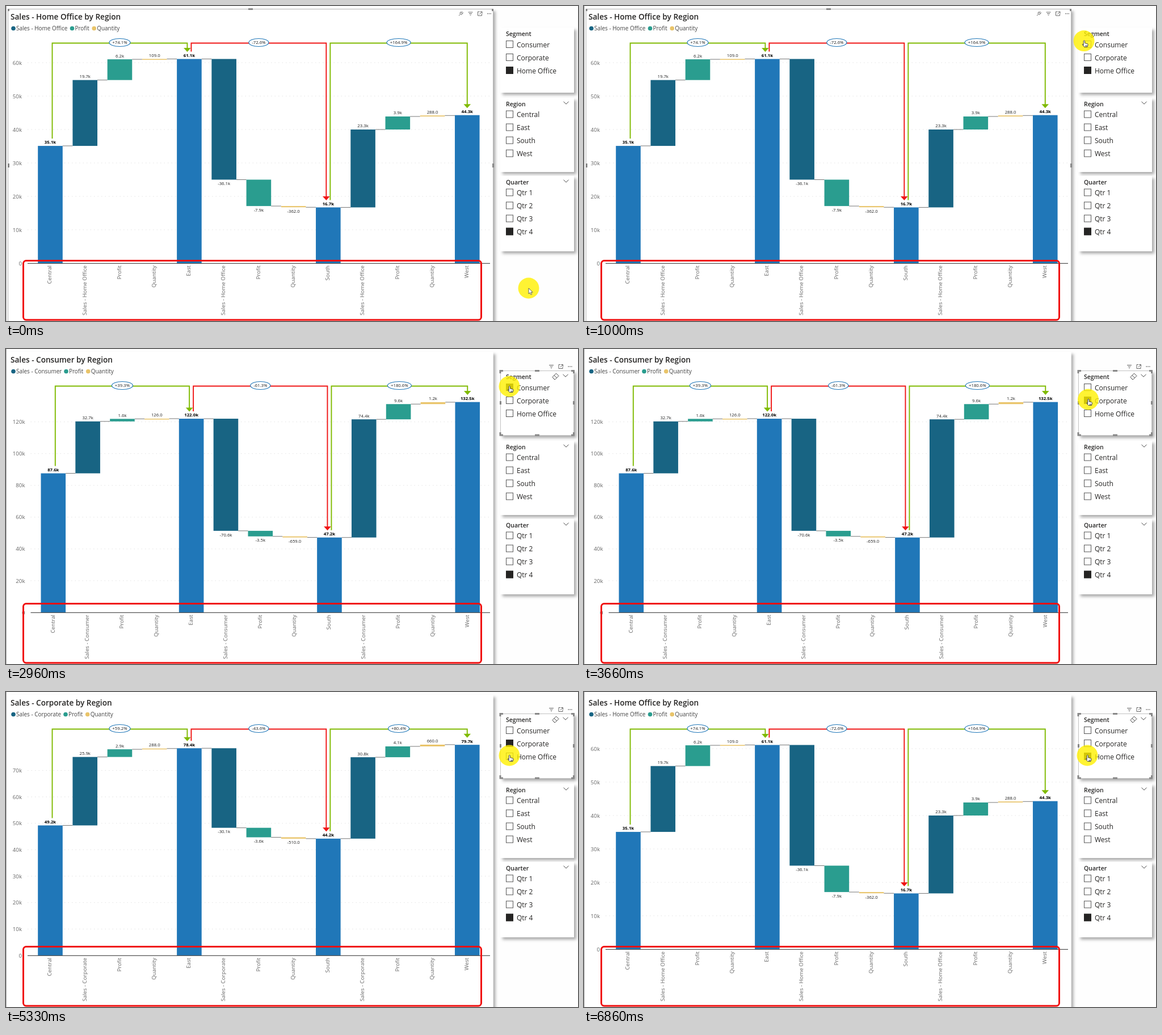
These frames come from a looping animation (1008x556 px, 7360 ms). An HTML page:

```html
<!DOCTYPE html>
<html lang="en">
<head>
<meta charset="utf-8">
<title>Sales by Region</title>
<style>
  html, body { margin: 0; width: 100%; height: 100%; overflow: hidden; background: #fefefe; }
  svg { display: block; width: 1008px; height: 556px; }
  text { font-family: "Open Sans", "Noto Sans", sans-serif; fill: #252423; }
  .title { font-size: 13.6px; font-weight: 600; }
  .legend { font-size: 9.95px; fill: #444; }
  .axis { font-size: 9.7px; fill: #666; text-anchor: end; }
  .value { font-size: 7.75px; text-anchor: middle; fill: #222; }
  .total { font-weight: 700; fill: #000; }
  .head { font-size: 10.5px; font-weight: 600; }
  .item { font-size: 12px; }
  .icon { fill: none; stroke: #666; }
</style>
</head>
<body>
<svg id="stage" viewBox="0 0 1008 556"></svg>
<script>
const LOOP = 7360;
const BLUE = '#2077b8', DARK = '#186483', TEAL = '#2a9d8f', GOLD = '#e9c46a';
const GREEN = '#7fba00', RED = '#f01414';
const REGIONS = ['Central', 'East', 'South', 'West'];

// first total, then the nine changes between the four regions, in thousands
const homeOffice = {
  name: 'Home Office', zero: 454, scale: 5.9, tick: 10, ticks: 6, left: 56.2, step: 61.23, axisX: 28, legendX: 116.5,
  start: 35.1, deltas: [19.7, 6.2, .109, -36.1, -7.9, -.362, 23.3, 3.9, .288],
  totals: [35.1, 61.1, 16.7, 44.3], growth: ['+74.1%', '-72.6%', '+164.9%']
};
const consumer = {
  name: 'Consumer', zero: 465, scale: 2.803, tick: 20, ticks: 6, left: 61.5, step: 60.83, axisX: 33.5, legendX: 106,
  start: 87.6, deltas: [32.7, 1.6, .126, -70.6, -3.5, -.659, 74.4, 9.6, 1.2],
  totals: [87.6, 122, 47.2, 132.5], growth: ['+39.3%', '-61.3%', '+180.6%']
};
const corporate = {
  name: 'Corporate', zero: 465, scale: 4.665, tick: 10, ticks: 7, left: 56.2, step: 61.23, axisX: 28, legendX: 105,
  start: 49.2, deltas: [25.9, 2.9, .288, -30.1, -3.6, -.51, 30.8, 4.1, .66],
  totals: [49.2, 78.4, 44.2, 79.7], growth: ['+59.2%', '-43.6%', '+80.4%']
};

const text = (x, y, cls, s) => `<text x="${x}" y="${y}" class="${cls}">${s}</text>`;
const rect = (x, y, w, h, fill) => `<rect x="${x}" y="${y}" width="${w}" height="${h}" fill="${fill}"/>`;
const path = (d, stroke, width = 1, more = '') =>
  `<path d="${d}" fill="none" stroke="${stroke}" stroke-width="${width}" ${more}/>`;
const dot = (x, fill) => `<circle cx="${x}" cy="39.5" r="3.8" fill="${fill}"/>`;
const group = (id, body) => `<g id="${id}">${body}</g>`;
const valueLabel = d => Math.abs(d) < 1 ? (d * 1000).toFixed(1) : d.toFixed(1) + 'k';

function chart(c) {
  const W = 43.6, y = v => c.zero - v * c.scale;
  const series = ['Sales - ' + c.name, 'Profit', 'Quantity'], colors = [DARK, TEAL, GOLD];
  let out = text(8, 24, 'title', `Sales - ${c.name} by Region`);
  [13, c.legendX, c.legendX + 38.7].forEach((x, i) =>
    out += dot(x, colors[i]) + text(x + 5, 43.3, 'legend', series[i]));

  for (let i = 0; i <= c.ticks; i++) {
    const ty = y(i * c.tick);
    if (i) out += path(`M${c.axisX + 10} ${ty}H853`, '#e2e2e2', 1, 'stroke-dasharray="1.5 5"');
    out += text(c.axisX, ty + 3.6, 'axis', i ? i * c.tick + 'k' : '0');
  }

  let level = c.start, links = '', bars = '', labels = '', names = '';
  const tops = [];
  for (let i = 0; i < 13; i++) {
    const x = c.left + i * c.step, mid = x + W / 2, kind = i % 3, region = i / 3;
    const isTotal = kind === 0;
    if (isTotal) {
      level = c.totals[region];
      const top = y(level);
      tops.push({ mid, top });
      bars += rect(x, top, W, c.zero - top, BLUE);
      labels += text(mid, top - 3.6, 'value total', level.toFixed(1) + 'k');
    }
    // totals and the first change of each region sit in a run of four bars
    names += `<text class="axis" transform="translate(${mid + 2.3} ${c.zero + 4})rotate(-90)">` +
      `${isTotal ? REGIONS[region] : ''}</text>`;
    if (i < 12) links += path(`M${x + W} ${y(level)}H${x + c.step}`, '#777');
  }
  return { out, y, W, tops };
}

// Thirteen columns: region total followed by three changes, four totals in all.
function waterfall(c) {
  const W = 43.6, y = v => c.zero - v * c.scale;
  const series = ['Sales - ' + c.name, 'Profit', 'Quantity'], colors = [DARK, TEAL, GOLD];
  let out = text(8, 24, 'title', `Sales - ${c.name} by Region`);
  [13, c.legendX, c.legendX + 38.7].forEach((x, i) =>
    out += dot(x, colors[i]) + text(x + 5, 43.3, 'legend', series[i]));

  for (let i = 0; i <= c.ticks; i++) {
    const ty = y(i * c.tick);
    if (i) out += path(`M${c.axisX + 10} ${ty}H853`, '#e2e2e2', 1, 'stroke-dasharray="1.5 5"');
    out += text(c.axisX, ty + 3.6, 'axis', i ? i * c.tick + 'k' : '0');
  }

  const tops = [];
  let level = c.start;
  for (let i = 0; i < 13; i++) {
    const x = c.left + i * c.step, mid = x + W / 2, part = i % 4, region = Math.floor(i / 4);
    let name = REGIONS[region];
    if (part === 0) {
      level = c.totals[region];
      const top = y(level);
      tops.push({ mid, top });
      out += rect(x, top, W, c.zero - top, BLUE) + text(mid, top - 3.6, 'value total', level.toFixed(1) + 'k');
    } else {
      const d = c.deltas[region * 3 + part - 1], from = y(level);
      level += d;
      const to = y(level), top = Math.min(from, to), h = Math.max(Math.abs(to - from), 1.5);
      name = series[part - 1];
      out += rect(x, top, W, h, colors[part - 1]) +
        text(mid, d > 0 ? top - 3.6 : top + h + 9.6, 'value', valueLabel(d));
    }
    if (i < 12) out += path(`M${x + W} ${y(level)}H${x + c.step}`, '#777');
    out += `<text class="axis" transform="translate(${mid + 2.3} ${c.zero + 4})rotate(-90)">${name}</text>`;
  }
  out += path(`M${c.axisX + 10} ${c.zero + .3}H853`, '#555', 1.2);

  c.growth.forEach((g, i) => {
    const a = tops[i], b = tops[i + 1], color = g[0] === '+' ? GREEN : RED;
    const x1 = a.mid + 3.5, x2 = b.mid - (i < 2 ? 3.5 : 0), tip = b.top - 12.5, cx = (x1 + x2) / 2;
    out += path(`M${x1} ${a.top - 13}V65.5H${x2}V${tip - 5}`, color, 1.9) +
      `<path d="M${x2 - 6.3} ${tip - 7}h12.6l-6.3 7z" fill="${color}"/>` +
      `<ellipse cx="${cx}" cy="64.5" rx="${g.length > 6 ? 21 : g[0] === '+' ? 18.5 : 17.5}" ry="7" fill="#fff" stroke="${BLUE}" stroke-width="1.2"/>` +
      text(cx, 67.3, 'value', g);
  });
  return out;
}

const chevron = (x, y) => path(`M${x - 4.5} ${y - 2.3}l4.5 4.5 4.5 -4.5`, '#444');
const menuIcons = (x, y) => `<g class="icon">
  <path d="M${x - 4} ${y - 2.5}h8M${x - 2.5} ${y}h5M${x - 1} ${y + 2.5}h2"/>
  <path d="M${x + 16} ${y - 3.5}h-3v7h7v-3M${x + 17} ${y - 3.5}h3.5v3.5M${x + 20} ${y - 3}l-4 4"/>
  <path d="M${x + 29.5} ${y}h7" stroke-width="1.5" stroke-dasharray="1.5 1.3"/></g>`;

function slicer(y, h, title, items, first) {
  return `<rect x="871" y="${y}" width="130" height="${h}" fill="#fff" filter="url(#shadow)"/>` +
    text(881, y + 14.5, 'head', title) +
    items.map((s, i) => {
      const cy = first + i * 23;
      return `<rect x="881.5" y="${cy - 6}" width="12" height="12" fill="#fff" stroke="#555"/>` +
        text(900, cy + 5, 'item', s);
    }).join('');
}
const check = (id, cy) => group(id, rect(881, cy - 6.5, 13, 13, '#252423'));

const chartFocus = path('M3.5 556V5.5H858.5V556', '#b5b5b5') +
  rect(427, 4, 8, 3, '#888') + rect(3, 278, 3, 7, '#888') + rect(857, 278, 3, 7, '#888') +
  rect(3, 5, 3, 4, '#888') + rect(856, 5, 3, 4, '#888') +
  menuIcons(818.5, 13.5) +
  '<path class="icon" d="M801 10l4 4M803 9.500l3 3M802 11l-2.500 1.500 3 3 1.500 -2.500M800.500 14.500l-2.500 2.500"/>';

const slicerFocus = path('M871.5 38.5H1000.5V152.5H871.5Z', '#c4c4c4') +
  path('M871 43V38.500H876M996 38.500H1000.500V43M1000.500 147V152H996M876 152H871V147' +
    'M932 38.500h8M932 152h8M871.500 92v6M1000.500 92v6', '#888', 3) +
  menuIcons(961, 31) + chevron(986, 47) +
  path('M963 49.500l6.500 -6.500 4.500 4.500 -6 6h-2zM966 46.500l4.500 4.500', '#444');

const arrow = '<path d="M0 0v10l2.300 -2.100 1.700 3.600 1.700 -.8 -1.700 -3.400h3.200z" fill="#fff" stroke="#444" stroke-width=".8"/>';
const hand = '<path d="M-.8 8V.2Q.4 -1.500 1.600 .2V4L6 5Q7.300 5.400 7 7L6 10.500H.5L-3 6.300Q-2.800 5 -.8 6.500M3 10V7.500M4.800 10V7.500" fill="#fff" stroke="#333" stroke-width=".9"/>';

const charts = [homeOffice, consumer, corporate];
const stage = document.getElementById('stage');
stage.innerHTML = `
  <defs><filter id="shadow" x="-10%" y="-10%" width="125%" height="125%">
    <feDropShadow dx="4" dy="4" stdDeviation="2.4" flood-color="#000" flood-opacity=".32"/>
  </filter></defs>
  <rect x="1" y="5" width="857.5" height="600" fill="#fff" filter="url(#shadow)"/>` +
  path('M.5 0V556', '#b0b0b0') +
  charts.map((c, i) => group('chart' + i, waterfall(c))).join('') +
  group('chartFocus', chartFocus) +
  '<rect x="30.500" y="449.500" width="807" height="104.500" rx="5" fill="none" stroke="#f01010" stroke-width="3"/>' +
  slicer(38, 115, 'Segment', ['Consumer', 'Corporate', 'Home Office'], 67.5) +
  slicer(162, 131, 'Region', REGIONS, 191) +
  slicer(300, 133, 'Quarter', ['Qtr 1', 'Qtr 2', 'Qtr 3', 'Qtr 4'], 329) +
  check('quarter4', 398) + check('check0', 113.5) + check('check1', 67.5) + check('check2', 90.5) +
  chevron(987, 171) + group('quarterMenu', chevron(987, 309)) +
  group('slicerFocus', slicerFocus) +
  group('cursor', '<circle r="18.500" fill="#fff000" fill-opacity=".8"/>' + group('arrow', arrow) + group('hand', hand));

// time, x, y
const moves = [
  [0, 921, 498], [360, 921, 498], [600, 882, 88], [1060, 881, 60.5], [1100, 881, 60.5], [1360, 885.5, 63],
  [2930, 885.5, 63], [2960, 887, 66], [3330, 888.5, 89], [4900, 888.5, 89], [5060, 886, 109],
  [5260, 886, 109], [5330, 887, 112], [LOOP, 887, 112]
];
function cursorAt(t) {
  const i = moves.findIndex(m => m[0] > t);
  const [t0, x0, y0] = moves[i - 1], [t1, x1, y1] = moves[i];
  const k = (1 - Math.cos(Math.PI * (t - t0) / (t1 - t0))) / 2;
  return [x0 + (x1 - x0) * k, y0 + (y1 - y0) * k];
}

const el = id => document.getElementById(id);
const show = (id, on) => { el(id).style.display = on ? '' : 'none'; };
const within = (t, a, b) => t >= a && t < b;

function draw(t) {
  const shown = within(t, 1930, 4100) ? 1 : within(t, 4100, 6860) ? 2 : 0;
  const checked = within(t, 1560, 3660) ? 1 : within(t, 3660, 6130) ? 2 : 0;
  for (let i = 0; i < 3; i++) {
    show('chart' + i, i === shown);
    show('check' + i, i === checked);
  }
  show('chartFocus', t < 1560);
  show('slicerFocus', t >= 1560);
  show('quarterMenu', !within(t, 450, 1060));
  show('arrow', t < 570);
  show('hand', t >= 570);
  el('cursor').setAttribute('transform', `translate(${cursorAt(t)})`);
}

const begin = performance.now();
function frame() {
  draw((performance.now() - begin) % LOOP);
  requestAnimationFrame(frame);
}
frame();
</script>
</body>
</html>
```
